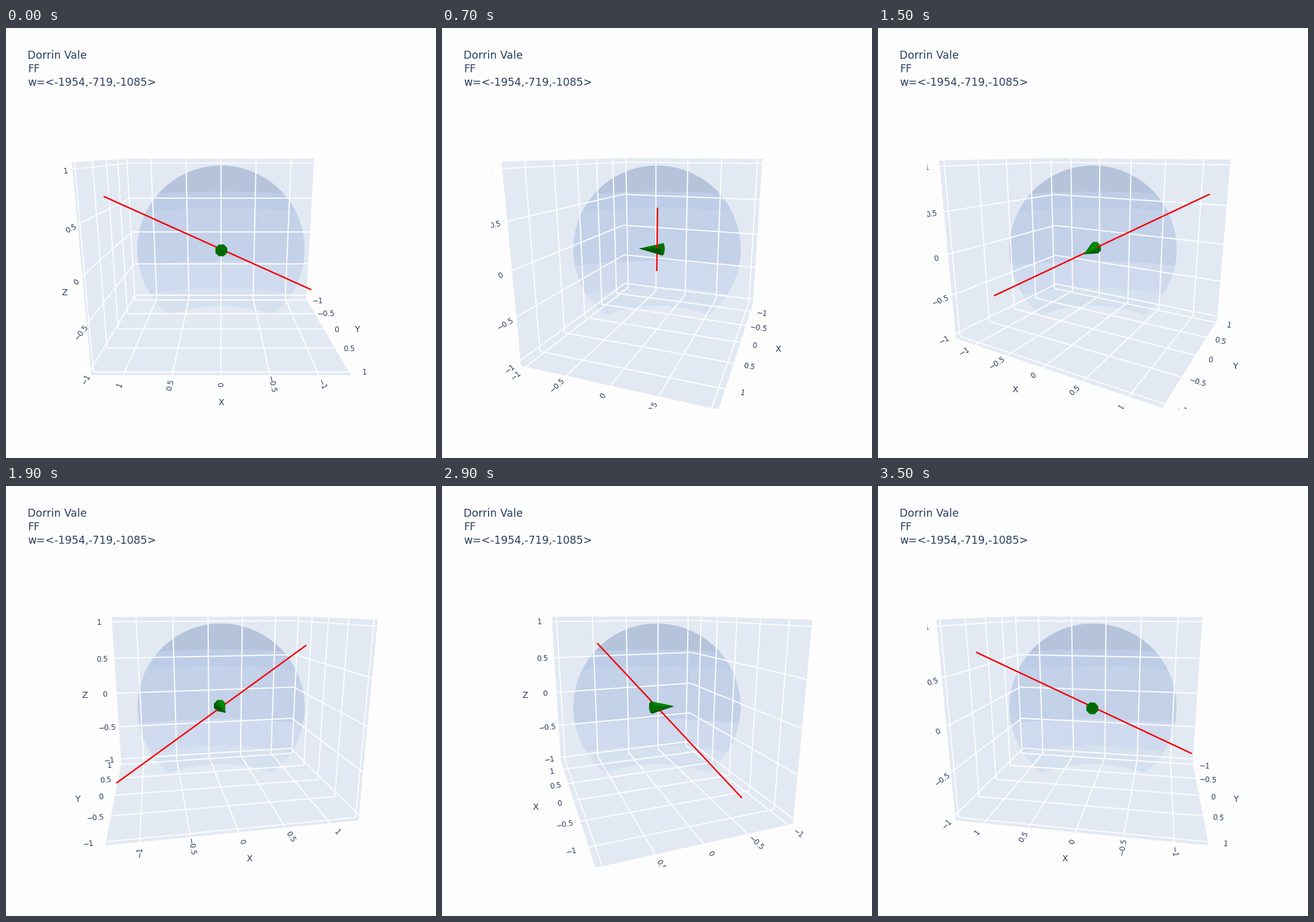
These frames come from a looping animation (700 px wide and 700 px high, 3.6 s). A matplotlib script:

```python
import numpy as np
import matplotlib.pyplot as plt
from matplotlib.animation import FuncAnimation
from matplotlib.collections import LineCollection
from matplotlib.patches import Circle, Polygon

SIZE, DPI, FRAMES = 700, 100, 36
PX = 72 / DPI
CX, CY = 350, 360                            # viewport centre
FOCAL = 260 / np.tan(np.pi / 8)              # 45 degree field of view

PAGE, WALL, GRID = "#fdfdfd", "#e2e9f3", "#fdfdfd"
INK, RED = "#2a3f5f", "#f20505"
plt.rcParams["font.family"] = "DejaVu Sans"

SPIN = np.array([-1954, -719, -1085])
AXIS = -SPIN / np.linalg.norm(SPIN)
REACH = 1.5                                  # half length of the spin axis
PAD = 17 / 16
HALF = PAD * np.array([REACH * AXIS[0], 1, 1])
SCALE = 2 * np.prod(HALF) ** (1 / 3)
EYE_R, EYE_Z = 2 * SCALE, 0.5 * SCALE
TICKS = np.array([-1, -0.5, 0, 0.5, 1])
TICK_GAP, NAME_GAP = 0.165, 0.435

# Cone: a quarter of its length lies behind the origin
LENGTH = 0.3
HEADING = np.array([0.053, -1, -0.045])
HEADING = HEADING / np.linalg.norm(HEADING)

fig = plt.figure(figsize=(SIZE / DPI, SIZE / DPI), dpi=DPI, facecolor=PAGE)
ax = fig.add_axes([80 / SIZE, 80 / SIZE, 540 / SIZE, 520 / SIZE])

for row, line in enumerate(("Dorrin Vale", "FF", "w=<-1954,-719,-1085>")):
    fig.text(35 / SIZE, 1 - (50 + 22 * row) / SIZE, line, color=INK,
             fontsize=17.4 * PX, va="baseline")


class Camera:
    def __init__(self, angle):
        s, c = np.sin(angle), np.cos(angle)
        self.eye = np.array([EYE_R * s, EYE_R * c, EYE_Z])
        self.dist = np.linalg.norm(self.eye)
        self.back = self.eye / self.dist
        self.right = np.array([-c, s, 0])
        self.up = np.cross(self.back, self.right)

    def project(self, pts):
        pts = np.asarray(pts, float)
        k = FOCAL / (self.dist - pts @ self.back)
        return np.stack([CX + k * (pts @ self.right),
                         CY - k * (pts @ self.up)], axis=-1)


def vec(**parts):
    return np.array([parts.get(n, 0) for n in "xyz"], float)


def draw_box(cam, wx, wy):
    hx, hy, hz = HALF
    outline = [(wx, -wy, hz), (wx, -wy, -hz), (-wx, -wy, -hz),
               (-wx, wy, -hz), (-wx, wy, hz), (wx, wy, hz)]
    ax.add_patch(Polygon(cam.project(outline), fc=WALL, ec="none"))
    lines = []
    for t in TICKS:
        lines += [[(t, -hy, -hz), (t, hy, -hz)], [(t, wy, -hz), (t, wy, hz)],
                  [(-hx, t, -hz), (hx, t, -hz)], [(wx, t, -hz), (wx, t, hz)],
                  [(wx, -hy, t), (wx, hy, t)], [(-hx, wy, t), (hx, wy, t)]]
    ax.add_collection(LineCollection(cam.project(lines), colors=GRID,
                                     linewidths=1.9 * PX))


def draw_ball():
    radius = FOCAL / np.sqrt(EYE_R ** 2 + EYE_Z ** 2 - 1)
    disc = ax.add_patch(Circle((CX, CY), radius, fc="none", ec="none"))
    u = np.linspace(-1, 1, 81)

    def arc(mid, drop):
        return mid + drop * u ** 2

    levels = [arc(CY - 140, 0), arc(266, 6), arc(293, 8), arc(379, 8),
              arc(422, 16), arc(452, 39)]
    tints = "#a3b4d1", "#afc2e2", "#b6c8e5", "#c7d5ec", "#d2deef"
    for top, low, tint in zip(levels, levels[1:], tints):
        band = ax.fill_between(CX + 138 * u, top, low, color=tint,
                               alpha=0.7, lw=0)
        band.set_clip_path(disc)


def draw_cone(cam, order):
    side = np.cross(HEADING, [0, 0, 1])
    side /= np.linalg.norm(side)
    other = np.cross(HEADING, side)
    a = np.arange(9) * np.pi / 4 + np.pi / 8
    ring = (-LENGTH / 4 * HEADING + LENGTH / 4 *
            (np.cos(a)[:, None] * side + np.sin(a)[:, None] * other))
    tip = 0.75 * LENGTH * HEADING
    light = 0.4 * cam.right + 0.85 * cam.up + 0.35 * cam.back

    def face(pts, normal, green):
        if normal @ (cam.eye - pts[0]) > 0:
            tint = (0, green / 255, 0)
            ax.add_patch(Polygon(cam.project(pts), fc=tint, ec=tint,
                                 lw=0.4, zorder=order))

    for p, q in zip(ring, ring[1:]):
        n = np.cross(q - p, tip - p)
        n *= np.sign(n @ (p + q + LENGTH / 2 * HEADING)) / np.linalg.norm(n)
        face(np.array([p, q, tip]), n, 84 + 58 * max(0, n @ light))
    face(ring[:-1], -HEADING, 108)


def draw_spin_axis(cam, order):
    # Each half is in front of the cone if it leaves through a visible side
    for sign in (1, -1):
        d = sign * AXIS
        normal = np.array([d[0], 0, d[2]]) / np.hypot(d[0], d[2])
        normal[1] = -0.25
        front = normal @ cam.back > 0
        start = 0.06 * d if front else 0 * d
        xy = cam.project([start, REACH * d])
        ax.plot(*xy.T, color=RED, lw=2.4 * PX, solid_capstyle="butt",
                zorder=order + (1 if front else -1))


def put_text(xy, text, size, angle=0):
    a, drop = np.radians(angle), 0.1 * size
    ax.text(xy[0] + drop * np.sin(a), xy[1] + drop * np.cos(a), text,
            fontsize=size * PX, color=INK, rotation=angle, ha="center",
            va="center", clip_on=True, zorder=9)


def label_axis(cam, name, edge, out):
    along = vec(**{name: 1})
    for t in TICKS:
        foot = edge + t * along
        p, q = cam.project([foot, foot + TICK_GAP * out])
        dx, dy = q - p
        angle = np.degrees(np.arctan2(-dy, dx))
        angle = 90 - (90 - angle) % 180
        put_text(q, f"{t:g}".replace("-", "\u2212"), 12, angle)
    put_text(cam.project(edge + NAME_GAP * out), name.upper(), 14)


def draw_labels(cam, wx, wy):
    hz = HALF[2]
    label_axis(cam, "x", vec(y=-wy, z=-hz), vec(y=-np.sign(wy)))
    label_axis(cam, "y", vec(x=-wx, z=-hz), vec(x=-np.sign(wx)))
    # The upright scale sits on the leftmost edge
    choices = [(vec(x=wx, y=-wy), vec(y=-np.sign(wy))),
               (vec(x=-wx, y=wy), vec(x=-np.sign(wx)))]
    edge, out = min(choices, key=lambda c: cam.project(c[0])[0])
    label_axis(cam, "z", edge, out)


def draw(i):
    ax.cla()
    ax.set(xlim=(80, 620), ylim=(620, 100))
    ax.axis("off")
    cam = Camera(2 * np.pi * i / FRAMES)
    wx = -HALF[0] if cam.eye[0] > 0 else HALF[0]
    wy = -HALF[1] if cam.eye[1] > 0 else HALF[1]
    draw_box(cam, wx, wy)
    draw_ball()
    draw_spin_axis(cam, 5)
    draw_cone(cam, 5)
    draw_labels(cam, wx, wy)
    return []


anim = FuncAnimation(fig, draw, frames=FRAMES, init_func=lambda: [],
                     interval=100, repeat=True, repeat_delay=0)
plt.show()
```
